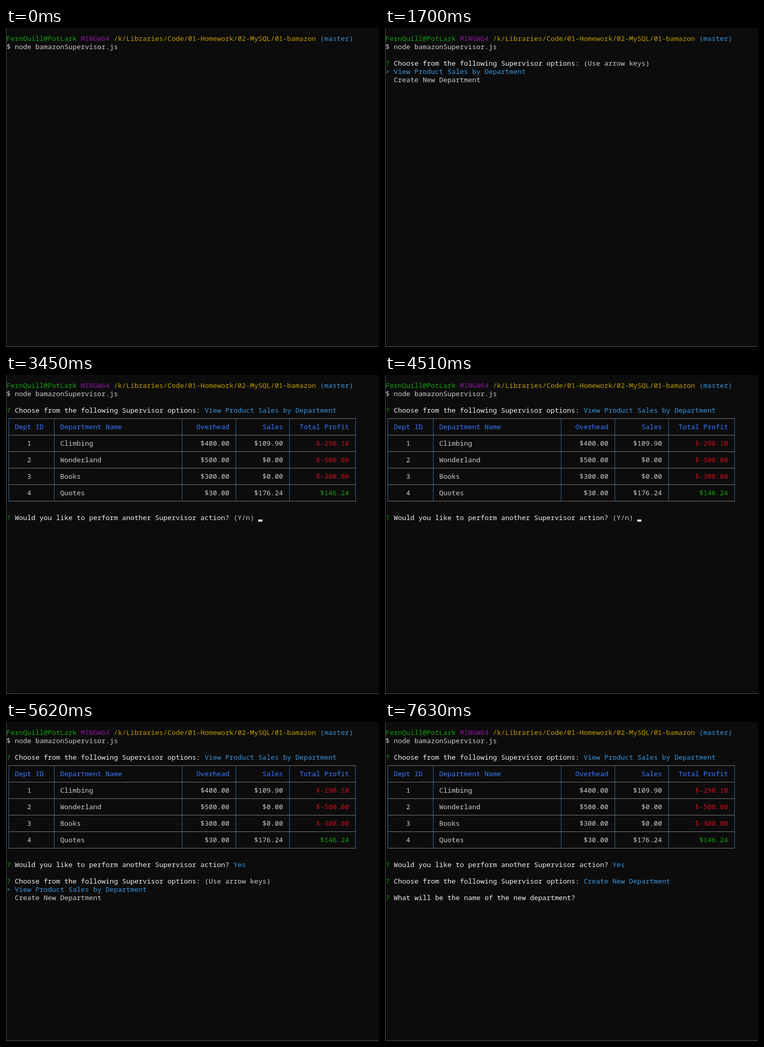
Recreate the animation shown at these times as an HTML page with a canvas. Size 723 by 618 pixels, loop 8 s.

```html
<!DOCTYPE html>
<html lang="en">
<head>
<meta charset="utf-8">
<title>Supervisor terminal</title>
<style>
  html, body { margin: 0; width: 100%; height: 100%; overflow: hidden; background: #0c0c0c; }
  canvas { display: block; }
</style>
</head>
<body>
<canvas id="stage" width="723" height="618"></canvas>
<script>
const ctx = document.getElementById('stage').getContext('2d', { alpha: false });
const LOOP = 8000, CELL_W = 8, CELL_H = 16, LEFT = 1, TOP = 12;
const color = {
  back: '#0c0c0c', text: '#cccccc', bright: '#f2f2f2', green: '#13a10e', purple: '#881798',
  yellow: '#c19c00', cyan: '#3a96dd', blue: '#3b78ff', red: '#c50f1f',
  rule: '#767676', stem: '#36658f', edge: '#555555'
};
const options = ['View Product Sales by Department', 'Create New Department'];
const choose = 'Choose from the following Supervisor options: ';
const another = 'Would you like to perform another Supervisor action? ';

// Visible cursor spans: start, end, row, column
const cursors = [
  [310, 840, 1, 28], [1020, 1330, 2, 0], [1640, 1700, 3, 0],
  [2820, 2940, 16, 61], [3450, 4010, 16, 61], [4510, 4760, 16, 61],
  [4760, 4820, 16, 0], [4820, 5000, 16, 62], [7380, 7630, 20, 47]
];

// Table columns: title, left border, first text column (or right end), alignment
const columns = [
  ['Dept ID', 0, 2, 'left'],
  ['Department Name', 11, 13, 'left'],
  ['Overhead', 42, 54, 'right'],
  ['Sales', 55, 67, 'right'],
  ['Total Profit', 68, 83, 'right']
];
const TABLE_END = 84;
const departments = [
  ['   1', 'Climbing', '$400.00', '$109.90', '$-290.10'],
  ['   2', 'Wonderland', '$500.00', '$0.00', '$-500.00'],
  ['   3', 'Books', '$300.00', '$0.00', '$-300.00'],
  ['   4', 'Quotes', '$30.00', '$176.24', '$146.24']
];

const cellX = col => LEFT + col * CELL_W;
const cellY = row => TOP + row * CELL_H;

function rect(x, y, w, h, fill) {
  ctx.fillStyle = fill;
  ctx.fillRect(x, y, w, h);
}

function write(row, col, ...parts) {
  for (const [text, fill] of parts) {
    ctx.fillStyle = fill;
    ctx.fillText(text, cellX(col), cellY(row) + 13);
    col += text.length;
  }
}

function ask(row, question, answer = '', fill = color.cyan) {
  write(row, 0, ['? ', color.green], [question, color.bright], [answer, fill]);
}

function menu(row, selected) {
  options.forEach((option, i) => {
    const on = i === selected;
    write(row + i, 0, [(on ? '> ' : '  ') + option, on ? color.cyan : color.text]);
  });
}

function table(row) {
  const x = cellX(0) + 4, y = cellY(row) + 8;
  const width = TABLE_END * CELL_W + 1, height = (departments.length + 1) * 32 + 1;
  for (const col of [...columns.map(c => c[1]), TABLE_END]) {
    rect(x + col * CELL_W, y, 1, height, color.stem);
  }
  for (let i = 0; i <= departments.length + 1; i++) rect(x, y + i * 32, width, 1, color.rule);

  [columns.map(c => c[0]), ...departments].forEach((cells, i) => {
    cells.forEach((text, j) => {
      const [, , start, align] = columns[j];
      const profit = text.includes('-') ? color.red : color.green;
      const fill = i === 0 ? color.blue : j === 4 ? profit : color.text;
      write(row + 1 + i * 2, align === 'right' ? start - text.length : start, [text, fill]);
    });
  });
}

function draw(t) {
  rect(0, 0, 723, 618, color.back);
  rect(0, 0, 1, 618, color.edge);
  rect(0, 617, 723, 1, color.edge);
  ctx.font = '13.3333px "Noto Sans Mono", "DejaVu Sans Mono", monospace';

  write(0, 0, ['FernQuill@PotLark ', color.green], ['MINGW64 ', color.purple],
    ['/k/Libraries/Code/01-Homework/02-MySQL/01-bamazon ', color.yellow], ['(master)', color.cyan]);
  write(1, 0, ['$ node bamazonSupervisor.js', color.text]);

  if (t >= 2820) {
    ask(3, choose, options[0]);
    table(4);
    if (t >= 5560) ask(16, another, 'Yes');
    else if (t >= 4820) ask(16, another, '(Y/n) y', color.text);
    else if (t < 4760) ask(16, another, '(Y/n) ', color.text);
  } else if (t >= 1700) {
    ask(3, choose, '(Use arrow keys)', color.text);
    menu(4, 0);
  }

  if (t >= 7380) {
    ask(18, choose, options[1]);
    ask(20, 'What will be the name of the new department? ');
  } else if (t >= 5620) {
    const moved = t >= 6920;
    ask(18, choose, moved ? '' : '(Use arrow keys)', color.text);
    menu(19, moved ? 1 : 0);
  }

  for (const [start, end, row, col] of cursors) {
    if (t >= start && t < end) rect(cellX(col), cellY(row) + 12, CELL_W, 4, '#ffffff');
  }
}

const begin = performance.now();
function frame() {
  draw((performance.now() - begin) % LOOP);
  requestAnimationFrame(frame);
}
frame();
</script>
</body>
</html>
```
